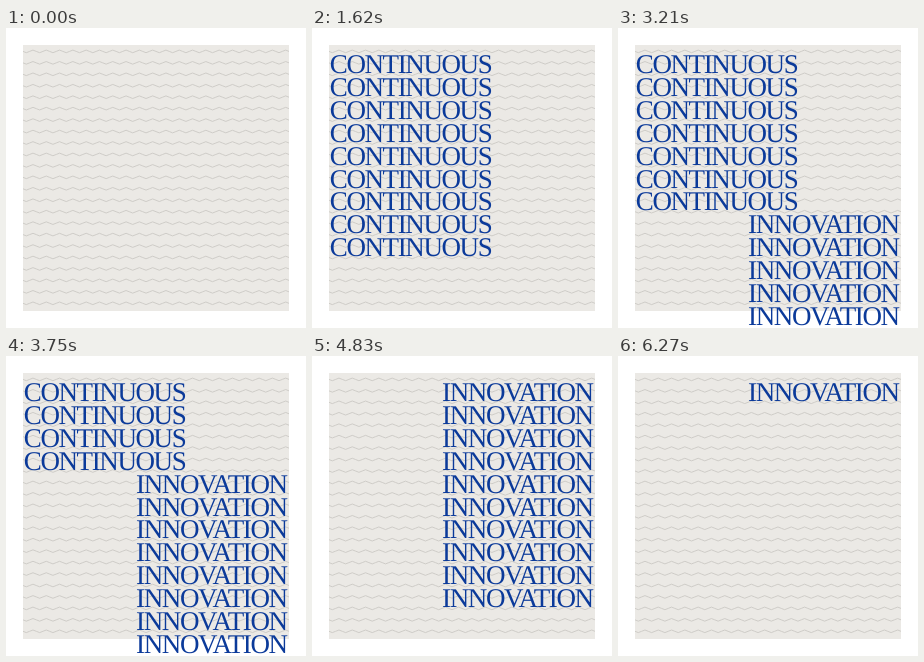
An HTML page for the animation above (6.3 s loop, 300x300 px).

```html
<!DOCTYPE html>
<html lang="en">
<head>
<meta charset="utf-8">
<title>Continuous Innovation</title>
<style>
  html, body { margin: 0; height: 100%; overflow: hidden; background: #fff; }
  svg { display: block; width: 100vw; height: 100vh; }
  text {
    font: 27px "Liberation Serif", "Times New Roman", serif;
    font-kerning: normal;
    letter-spacing: -1.4px;
    text-rendering: geometricPrecision;
    fill: #0b3a9a;
  }
</style>
</head>
<body>
<svg viewBox="0 0 300 300">
  <clipPath id="panel"><rect x="17" y="17" width="266" height="266"/></clipPath>
  <rect x="17" y="17" width="266" height="266" fill="#ebe9e5"/>
  <path id="waves" clip-path="url(#panel)" fill="none" stroke="#cbc9c4" stroke-width=".9"/>
  <g id="rows"></g>
</svg>
<script>
const ROWS = 12, PITCH = 22.9, STEP = 180, LOOP = 6300;
const SVG = "http://www.w3.org/2000/svg";

// Horizontal wavy lines, two per text row
const HALF = 6.65;
let d = "";
for (let i = 0; i < 23; i++) {
  d += `M17 ${23.4 + i * PITCH / 2}q${HALF / 2} 2.6 ${HALF} 0`;
  for (let x = 17 + HALF; x < 283; x += HALF) d += `t${HALF} 0`;
}
document.getElementById("waves").setAttribute("d", d);

const rows = Array.from({ length: ROWS }, (_, i) => {
  const row = document.createElementNS(SVG, "text");
  row.setAttribute("y", 45 + i * PITCH);
  return document.getElementById("rows").appendChild(row);
});

function setRow(row, word, x, anchor) {
  if (row.textContent === word) return;
  row.textContent = word;
  row.setAttribute("x", x);
  row.setAttribute("text-anchor", anchor);
}

// Fill downwards, swap words upwards, then clear upwards
function draw() {
  const n = Math.floor(performance.now() % LOOP / STEP);
  const left = n <= ROWS ? n : Math.max(0, 2 * ROWS - n);
  const shown = n <= ROWS ? n : Math.min(ROWS, (n < 32 ? 36 : 35) - n);
  rows.forEach((row, i) => {
    if (i < left) setRow(row, "CONTINUOUS", 17.8, "start");
    else if (i < shown) setRow(row, "INNOVATION", 280.6, "end");
    else setRow(row, "", 0, "start");
  });
  requestAnimationFrame(draw);
}
draw();
</script>
</body>
</html>
```
